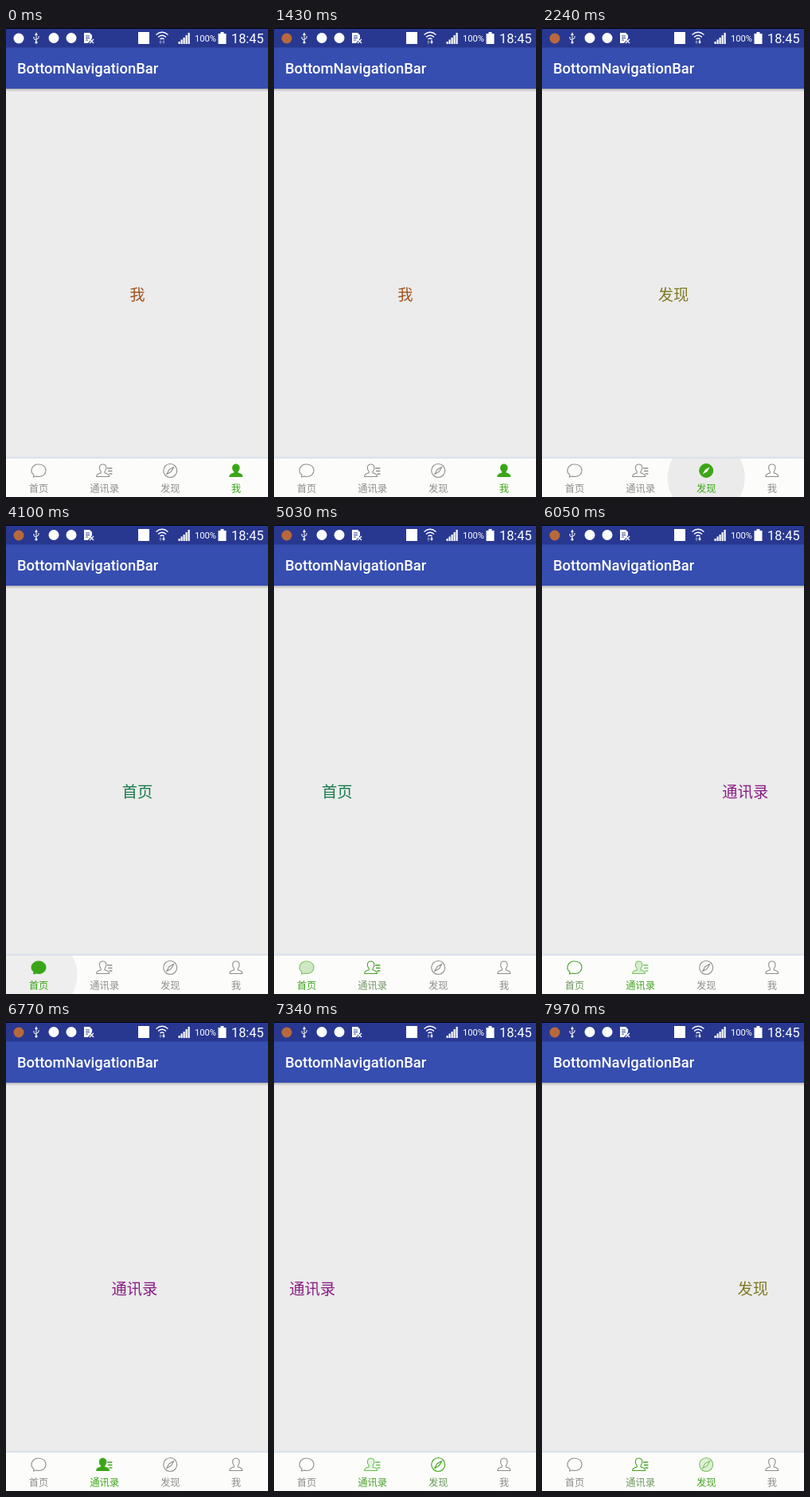
An HTML page that plays this animation: 329x587 px, repeating every 8000 ms.

```html
<!DOCTYPE html>
<html lang="zh-CN">
<head>
<meta charset="utf-8">
<title>BottomNavigationBar</title>
<style>
  html, body { margin: 0; width: 100%; height: 100%; overflow: hidden; background: #ececec; }
  svg { display: block; width: 329px; height: 587px; }
  text { font-family: "Noto Sans CJK SC", "Noto Sans CJK", sans-serif; text-anchor: middle; }
  .latin { font-family: Roboto, sans-serif; fill: #fff; text-anchor: start; }
  .page { font-size: 19.3px; }
  .label { font-size: 12.3px; }
  .line { fill: none; stroke-width: 1.1; stroke-linejoin: round; }
  .dash { stroke-width: 1.5; }
  .white { fill: none; stroke: #fff; stroke-width: 1.3; }
</style>
</head>
<body>
<svg viewBox="0 0 329 587">
  <defs>
    <linearGradient id="drop" x2="0" y2="1">
      <stop stop-color="#000" stop-opacity=".22"/>
      <stop offset="1" stop-color="#000" stop-opacity="0"/>
    </linearGradient>
    <linearGradient id="rise" x2="0" y2="1">
      <stop stop-color="#dfe4ee" stop-opacity="0"/>
      <stop offset="1" stop-color="#d6dcea"/>
    </linearGradient>
    <clipPath id="barClip"><rect y="539" width="329" height="48"/></clipPath>
  </defs>

  <rect width="329" height="587" fill="#ececec"/>
  <g id="pages"></g>

  <rect y="76" width="329" height="4" fill="url(#drop)"/>
  <rect y="24" width="329" height="52" fill="#364eb0"/>
  <rect width="329" height="24.5" fill="#283891"/>
  <rect width="329" height="1" fill="#000"/>
  <text class="latin" x="14" y="57" font-size="18.4" font-weight="500">BottomNavigationBar</text>

  <g id="status" fill="#fff">
    <circle id="badge" cx="16" cy="13" r="6.5"/>
    <path class="white" style="stroke-width:1" d="M38 7V18M35 11V13.5L38 15.5M41 10V12.5L38 14.5"/>
    <path d="M38 5.5L40 9H36Z"/>
    <circle cx="38" cy="18" r="1.6"/>
    <circle cx="60" cy="12.5" r="6.5"/>
    <circle cx="82" cy="12.5" r="6.5"/>
    <path d="M98 6H105L108 9V13L103 19H98Z"/>
    <path d="M100 10H105M100 12.5H105M100 15H103" stroke="#283891"/>
    <path class="white" d="M105 14L110 19M110 14L105 19"/>
    <rect x="166" y="5" width="14" height="15"/>
    <path class="white" d="M188.5 8.5Q196 2 203.5 8.5M191 11.5Q196 7 201 11.5M193.5 14Q196 12 198.5 14"/>
    <path id="up" d="M194 15L196 18H194.7V20H193.3V18H192Z"/>
    <path id="down" d="M198 20L196.2 17H197.3V15H198.7V17H199.8Z"/>
    <path d="M216.500 17h2.2v3h-2.2zM219.500 14.5h2.2v5.5h-2.2zM222.500 12h2.2v8h-2.2zM225.500 9h2.2v11h-2.2zM228.500 6h2.2v14h-2.2z"/>
    <path d="M269.5 5h4v2h3v13h-10v-13h3z"/>
  </g>
  <text class="latin" x="237" y="17" font-size="11.2">100%</text>
  <text class="latin" x="283" y="19" font-size="16.3">18:45</text>

  <rect y="535" width="329" height="4" fill="url(#rise)"/>
  <rect y="539" width="329" height="48" fill="#fcfdfa"/>
  <g clip-path="url(#barClip)">
    <circle id="ripple" cy="563" fill="#ebebeb"/>
  </g>
  <g id="tabs"></g>
</svg>
<script>
const LOOP = 8000, WIDTH = 329;
const GREY = [142, 142, 142], GREEN = [58, 166, 23];
const person = 'M-8 7.5C-8 3.6-4.6 4-2.4 2.7C-1.9 2.1-2.2 1.500-2.700.8C-5.4-2.500-4.700-8 0-8C4.700-8 5.400-2.500 2.700.8C2.200 1.500 1.900 2.100 2.400 2.700C4.600 4 8 3.600 8 7.500Z';
const bubble = 'M-6 5.3C-12 1-8.5-8 0-8C12-8 12 7.5 0 7.5Q-1.5 7.5-3 7L-6.5 8Z';
const disc = 'M-8.5 0A8.5 8.5 0 1 1 8.5 0A8.5 8.5 0 1 1-8.5 0Z';
const needle = 'M4.5-4.5L1.3 1.3L-4.5 4.5L-1.3-1.3Z';
const dashes = 'M3.5-3H9.8M4.5.5H9.8M6 4H9.8';

const tabs = [
  { name: '首页', color: '#147a4b', shape: bubble },
  { name: '通讯录', color: '#8a1c85', shape: person, dx: -2, pageX: 161.5, dashes },
  { name: '发现', color: '#7d7a1f', shape: disc, needle },
  { name: '我', color: '#a0521c', shape: person }
];

// start, tab, ripple length
const taps = [[1430, 0, 420], [2000, 2, 360], [2540, 3, 330], [3140, 1, 630], [3920, 0, 480]];
const TAP_DELAY = 60;

// time, page position, speed per ms
const swipes = [
  [4700, 0, 0], [5030, .26, .0005], [5480, .37, .0003], [6050, .714, .0009],
  [6290, .955, .0003], [6620, 1, 0], [6770, 1, 0], [7550, 1.5, .0006], [7970, 1.696, .0004]
];

const $ = id => document.getElementById(id);
const clamp = v => Math.max(0, Math.min(1, v));
const mix = k => `rgb(${GREY.map((g, i) => Math.round(g + (GREEN[i] - g) * k))})`;
const tabX = i => 41 + 82.6 * i;

function add(parent, tag, attrs, text) {
  const el = document.createElementNS('http://www.w3.org/2000/svg', tag);
  for (const key in attrs) el.setAttribute(key, attrs[key]);
  if (text) el.textContent = text;
  return parent.appendChild(el);
}

// Each icon has a solid layer that cross-fades with an outline layer.
tabs.forEach((tab, i) => {
  tab.page = add($('pages'), 'text', { class: 'page', y: 341, fill: tab.color }, tab.name);
  const icon = add($('tabs'), 'g', { transform: `translate(${tabX(i)} 554)` });
  const body = { d: tab.shape, transform: `translate(${tab.dx || 0} 0)` };
  tab.solid = add(icon, 'g', { stroke: mix(1) });
  tab.outline = add(icon, 'g', {});
  add(tab.solid, 'path', { ...body, fill: mix(1) });
  add(tab.outline, 'path', { ...body, class: 'line' });
  if (tab.dashes) {
    for (const layer of [tab.solid, tab.outline]) add(layer, 'path', { d: dashes, class: 'line dash' });
  }
  if (tab.needle) {
    add(tab.solid, 'path', { d: needle, fill: '#fff', stroke: 'none' });
    add(tab.outline, 'path', { d: needle, class: 'line' });
  }
  tab.label = add($('tabs'), 'text', { class: 'label', x: tabX(i), y: 581 }, tab.name);
});

function position(t) {
  if (t < swipes[0][0]) {
    return taps.reduce((p, [start, tab]) => t >= start + TAP_DELAY ? tab : p, 3);
  }
  const n = swipes.findIndex(s => s[0] > t);
  if (n < 0) {
    const [t0, p0, v0] = swipes[swipes.length - 1];
    return p0 + v0 * (t - t0);
  }
  const [t0, p0, v0] = swipes[n - 1], [t1, p1, v1] = swipes[n];
  const d = t1 - t0, u = (t - t0) / d, w = 1 - u;
  return p0 * w * w * (1 + 2 * u) + p1 * u * u * (3 - 2 * u) + d * u * w * (v0 * w - v1 * u);
}

function drawRipple(t) {
  const tap = taps.find(([start, , len]) => t >= start && t < start + len);
  const ripple = $('ripple');
  ripple.setAttribute('opacity', 0);
  if (!tap) return;
  const age = t - tap[0], grow = clamp(age / 180);
  ripple.setAttribute('cx', tabX(tap[1]));
  ripple.setAttribute('r', 20 + 28.5 * grow * (2 - grow));
  ripple.setAttribute('opacity', clamp(Math.min(age / 225, (tap[2] - age) / 120)));
}

function draw() {
  const t = performance.now() % LOOP, pos = position(t);
  tabs.forEach((tab, i) => {
    const near = clamp(1 - Math.abs(i - pos));
    const full = clamp(2 * near - 1);
    tab.page.setAttribute('x', (tab.pageX || 165) + WIDTH * (i - pos));
    tab.solid.setAttribute('opacity', full * full);
    tab.outline.setAttribute('opacity', 1 - full);
    tab.outline.setAttribute('stroke', mix(clamp(near * 3)));
    tab.label.setAttribute('fill', mix(clamp(near * 1.25)));
  });
  drawRipple(t);
  const later = t >= 500;
  $('badge').setAttribute('fill', later ? '#b8693c' : '#fff');
  $('up').setAttribute('opacity', .4);
  $('down').setAttribute('opacity', later ? 1 : .4);
  requestAnimationFrame(draw);
}
draw();
</script>
</body>
</html>
```
